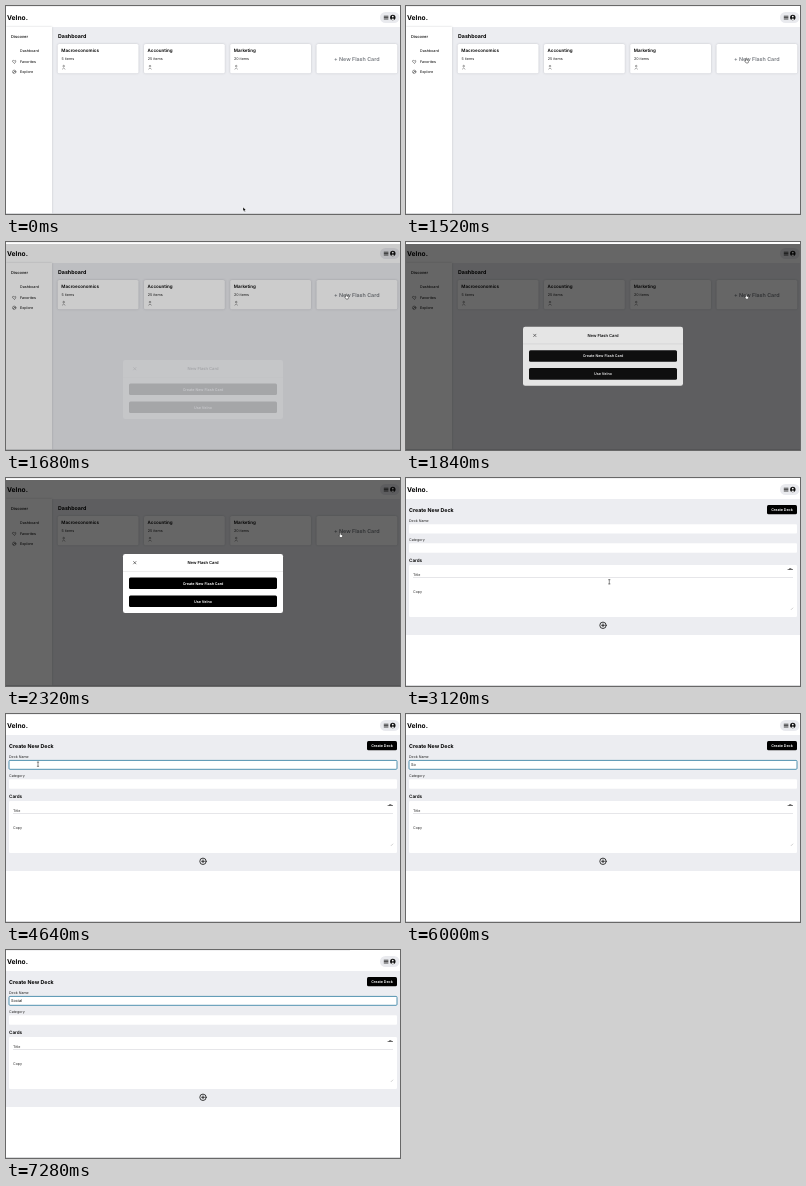
Recreate the animation shown at these times as an HTML page. Size 394 by 208 pixels, loop 8000 ms.

```html
<!DOCTYPE html>
<html lang="en">
<head>
<meta charset="utf-8">
<title>Flash cards</title>
<style>
  html, body { margin: 0; width: 100%; height: 100%; overflow: hidden; background: #fff; }
  svg { display: block; width: 100vw; height: 100vh; }
  text { font-family: Inter, "Open Sans", sans-serif; text-rendering: geometricPrecision; }
  .card { filter: drop-shadow(0 .8px 1px rgba(30, 35, 50, .2)); }
  .line { fill: none; stroke: #222; stroke-width: .6; stroke-linecap: round; stroke-linejoin: round; }
</style>
</head>
<body>
<svg id="stage" viewBox="0 0 394 208" preserveAspectRatio="none"></svg>
<script>
const BRAND = "Velno";
const LOOP = 8000, STEP = 80;
const GREY = "#ecedf1";
const stage = document.getElementById("stage");

const rect = (x, y, w, h, fill, r = 0, extra = "") =>
  `<rect x="${x}" y="${y}" width="${w}" height="${h}" rx="${r}" fill="${fill}" ${extra}/>`;
const text = (x, mid, size, weight, label, fill = "#000", anchor = "start", id = "") =>
  `<text x="${x}" y="${mid + size * .36}" font-size="${size}" font-weight="${weight}" fill="${fill}" text-anchor="${anchor}" id="${id}">${label}</text>`;
const line = (d, extra = "") => `<path class="line" d="${d}" ${extra}/>`;
const group = (id, body, extra = "") => `<g id="${id}" ${extra}>${body}</g>`;

const header = rect(0, 0, 394, 21, "#fff") +
  text(1, 11.6, 6.7, 700, BRAND + ".") +
  rect(374, 6, 19.5, 11, "#e9eaee", 5.5) +
  line("M378.2 10.2h3.8M378.2 11.6h3.8M378.2 13h3.8", 'style="stroke:#000;stroke-width:.7"') +
  `<circle cx="386.8" cy="11.5" r="2.7" fill="#111"/><circle cx="386.8" cy="10.6" r=".9" fill="#fff"/>
   <path d="M385.2 13.3q1.6-1.7 3.2 0q-1.6 1.2-3.2 0" fill="#fff"/>`;

const deck = (x, name, count) =>
  rect(x, 38, 80.8, 29.3, "#fff", 1.6, 'class="card"') +
  text(x + 3.6, 44.6, 4.5, 600, name) +
  text(x + 3.8, 53, 3.7, 400, count + " items", "#222") +
  `<circle cx="${x + 6}" cy="60.1" r=".8" fill="none" stroke="#444" stroke-width=".5"/>` +
  line(`M${x + 4.6} 63q1.4-2.2 2.8 0`, 'style="stroke:#555;stroke-width:.5"');

const dashboard =
  rect(0, 21, 394, 187, GREY) +
  rect(0, 21, 46, 187, "#fff", 0, 'class="card"') +
  text(5, 31, 4, 600, "Discover", "#222") +
  text(14, 45, 3.65, 500, "Dashboard", "#222") +
  text(14, 55.6, 3.65, 500, "Favorites", "#222") +
  text(14, 66, 3.65, 500, "Explore", "#222") +
  line("M8.2 57.3l-1.6-1.6q-.5-1.3.7-1.4l.9.7.9-.7q1.2.1.7 1.4z", 'style="stroke-width:.45"') +
  `<circle cx="8.2" cy="65.8" r="1.7" class="line" style="stroke-width:.45"/>` +
  line("M7.6 66.5l1.2-1.4") +
  text(52, 30, 5.3, 700, "Dashboard") +
  deck(51.7, "Macroeconomics", 5) + deck(138, "Accounting", 25) + deck(224.2, "Marketing", 20) +
  rect(310.5, 38, 80.8, 29.3, "#fff", 1.6, 'class="card"') +
  text(350.8, 53, 5.35, 600, "+ New Flash Card", "#777b80", "middle");

const button = (y, label, id) =>
  rect(123, y, 148, 11.6, "#000", 1.5, `id="${id}"`) +
  text(197, y + 5.8, 3.7, 600, label, "#fff", "middle");
const modal =
  rect(117, 76, 160, 59, "#fff", 2.2) +
  text(197, 84.7, 4.1, 600, "New Flash Card", "#000", "middle") +
  line("M127.6 83.5l2.4 2.4M130 83.5l-2.4 2.4") +
  rect(117, 93, 160, .5, "#ddd") +
  button(99.5, "Create New Flash Card", "create") +
  button(117.4, "Use " + BRAND, "assist");

const editor =
  rect(0, 21, 394, 187, "#fff") + rect(0, 21, 394, 136, GREY) +
  text(3, 31.6, 5.3, 700, "Create New Deck") +
  rect(361, 27, 30, 9.2, "#000", 1.5) +
  text(376, 31.6, 3.65, 600, "Create Deck", "#fff", "middle") +
  text(3, 43, 3.6, 400, "Deck Name", "#222") +
  rect(3, 46.2, 388, 9.2, "#fff", 1) +
  rect(3, 46.4, 388, 8.9, "none", 1, 'id="focus" stroke="#3f86a8" stroke-width=".9"') +
  text(5, 51, 3.9, 400, "", "#111", "start", "typed") +
  text(3, 62, 3.6, 400, "Category", "#222") +
  rect(3, 65.3, 388, 9.4, "#fff", 1) +
  text(3, 82, 4.6, 600, "Cards") +
  rect(3, 87, 388, 52, "#fff", 1.2) +
  line("M382 91.5h4.6M383.5 91.2v-.6h1.6v.6") +
  text(7, 96.6, 3.6, 400, "Title", "#222") +
  rect(7, 99.1, 380, .6, "#d5d6da") +
  text(7, 114, 3.6, 400, "Copy", "#222") +
  line("M385.2 131.6l1.6-1.6", 'style="stroke:#888;stroke-width:.4"') +
  `<circle cx="197" cy="147.3" r="3.2" class="line" style="stroke:#111;stroke-width:.8"/>` +
  line("M195.6 147.3h2.8M197 145.9v2.8", 'style="stroke:#111;stroke-width:.8"');

const cursors =
  group("arrow", `<path d="M-1-1.8v4l1-.9.7 1.4.8-.4-.7-1.3h1.2z" fill="#000" stroke="#fff" stroke-width=".4"/>`) +
  group("hand", `<path d="M-.7-2.2q.6-.6 1 0v1.7l1.5.5q.5.3.2 1.3l-.4 1.2h-2l-1.3-1.7q0-.8.8-.3z" fill="#fff" stroke="#111" stroke-width=".45"/>`) +
  group("beam", line("M-.7-2.1h1.4M0-2.1v4.2M-.7 2.1h1.4", 'style="stroke:#333;stroke-width:.55"'));

stage.innerHTML =
  rect(0, 0, 394, 208, "#fff") + header +
  group("dashboard", dashboard) + group("editor", editor) +
  rect(0, 0, 344, .5, "#e3e3e5") + rect(0, 207, 394, .7, "#c9cacd") +
  group("shade", rect(0, 2, 394, 206, "#000")) +
  group("modal", modal) + group("cursor", cursors);

const el = id => document.getElementById(id);
const show = (id, on) => el(id).setAttribute("visibility", on ? "inherit" : "hidden");

// Rows: time, then values.
const pointer = [
  [0, 238, 203], [240, 238, 203], [1040, 340, 55.5], [1280, 340, 55.5], [1360, 352.5, 56],
  [1440, 347, 55], [1520, 340.5, 54.5], [2240, 340.5, 54.8], [2880, 202, 105.5],
  [3040, 202, 105.5], [3120, 203.3, 103.8], [3680, 203.3, 103.8], [4000, 64, 71],
  [4080, 64, 71], [4640, 32, 50.2], [LOOP, 32, 50.2]
];
const opening = [ // shade opacity, modal opacity, modal offset
  [0, 0, 0, 59], [1600, 0, 0, 59], [1680, .2, .12, 42], [1760, .46, .5, 23],
  [1840, .6, .84, 8.7], [1920, .6, .96, 2.2], [2000, .6, 1, 0], [LOOP, .6, 1, 0]
];
const shapes = [[0, "arrow"], [960, "hand"], [2400, "arrow"], [2720, "hand"], [3120, "beam"],
  [3760, "arrow"], [4000, "beam"], [4160, "arrow"], [4480, "beam"], [5920, ""]];
const typing = [[0, ""], [5920, "S"], [6000, "So"], [6400, "Soc"], [6800, "Socia"], [7280, "Social"]];

const held = (rows, t) => rows.filter(row => row[0] <= t).pop()[1];
function eased(rows, t) {
  const next = rows.findIndex(row => row[0] > t);
  const a = rows[next - 1], b = rows[next];
  const p = (t - a[0]) / (b[0] - a[0]), k = p * p * (3 - 2 * p);
  return a.slice(1).map((v, i) => v + (b[i + 1] - v) * k);
}

function draw(t) {
  const editing = t >= 3120, open = t >= 1680 && !editing;
  show("dashboard", !editing);
  show("editor", editing);
  show("shade", open);
  show("modal", open);

  const [dim, alpha, drop] = eased(opening, t);
  el("shade").setAttribute("opacity", dim);
  el("modal").setAttribute("opacity", alpha);
  el("modal").setAttribute("transform", `translate(0 ${drop})`);
  el("create").setAttribute("fill", t >= 2720 ? "#2b2b2b" : "#000");

  show("focus", t >= 4480);
  el("typed").textContent = held(typing, t);

  const [x, y] = eased(pointer, t), shape = held(shapes, t);
  el("cursor").setAttribute("transform", `translate(${x} ${y})`);
  for (const id of ["arrow", "hand", "beam"]) show(id, id === shape);
}

const start = performance.now();
function tick() {
  const t = (performance.now() - start) % LOOP;
  draw(Math.floor(t / STEP) * STEP);
  requestAnimationFrame(tick);
}
tick();
</script>
</body>
</html>
```
